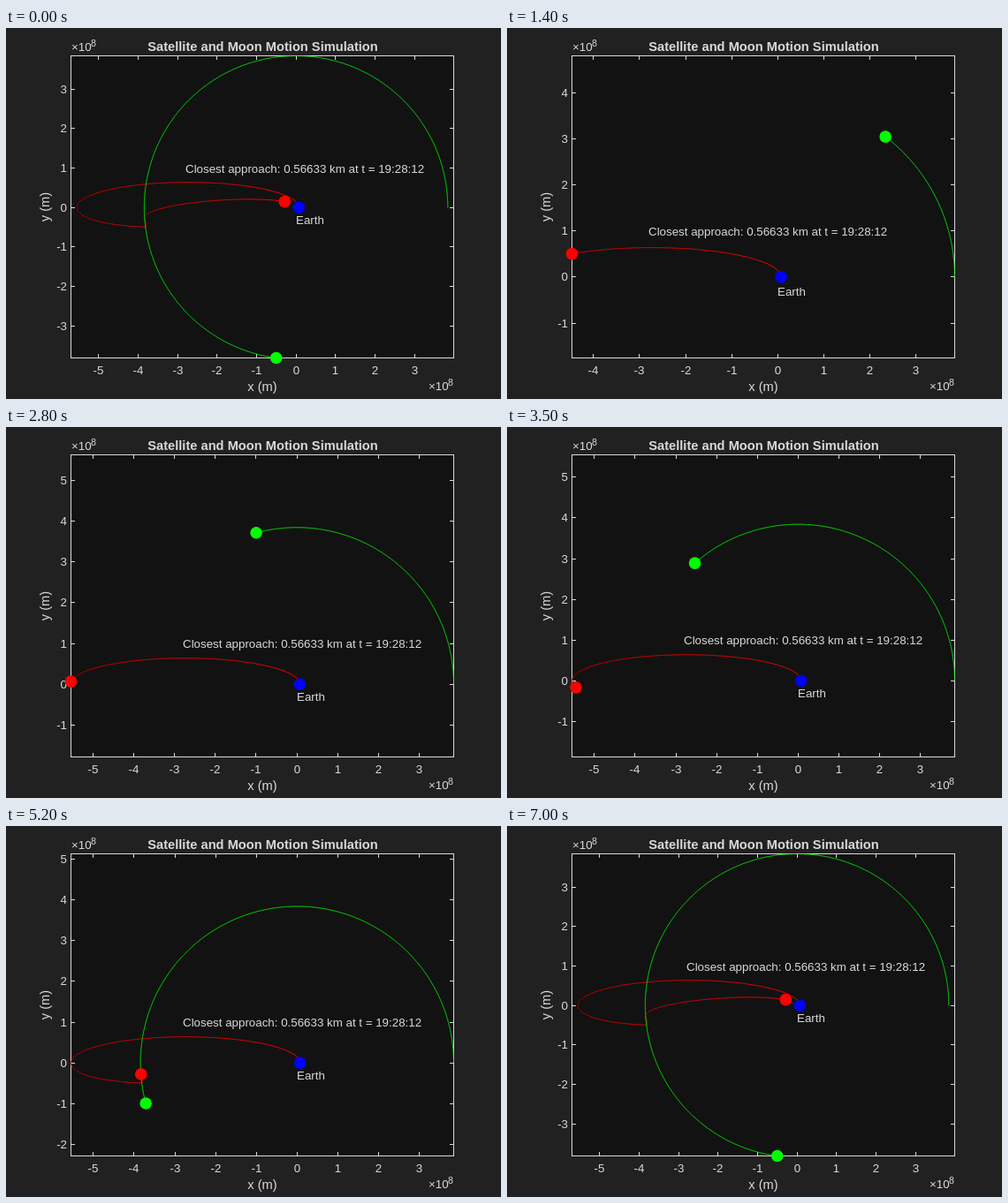
Animation, 560 px wide and 420 px high, one loop 7100 ms. Source, as an HTML page with a canvas:

```html
<!DOCTYPE html>
<html lang="en">
<head>
<meta charset="utf-8">
<title>Satellite and Moon Motion Simulation</title>
<style>
  html, body { margin: 0; height: 100%; overflow: hidden; background: #212121; }
  canvas { display: block; }
</style>
</head>
<body>
<canvas id="stage" width="560" height="420"></canvas>
<script>
const ctx = document.getElementById('stage').getContext('2d');
const STEPS = 70, STEP_MS = 100, SUB = 40;
const BOX = { left: 73.5, right: 506.5, top: 31.5, bottom: 373.5 };
const MID_X = (BOX.left + BOX.right) / 2, MID_Y = (BOX.top + BOX.bottom) / 2;
const INK = '#d9d9d9', FAMILY = '"Liberation Sans", Arial, sans-serif';
const SMALL = '13.333px ' + FAMILY, LARGE = '14.667px ' + FAMILY;
const MOON_R = 3.844, PERIGEE = 0.074;   // in units of 1e8 m

// Kepler's equation with the anomaly measured from apogee
function anomaly(m, e) {
  let u = 0;
  for (let i = 0; i < 14; i++) u -= (u + e * Math.sin(u) - m) / (1 + e * Math.cos(u));
  return u;
}

function moon(n) {
  const angle = n * 3.75 * Math.PI / 180;
  return [MOON_R * Math.cos(angle), MOON_R * Math.sin(angle)];
}

// Outbound transfer ellipse, slightly bent by the Moon after apogee
function outbound(n) {
  const a = 2.812, e = 0.9737, b = 0.64;
  const u = anomaly((n - 30) * Math.PI / 30, e);
  const pull = Math.max(0, (n - 30) / 20) ** 2.2;
  return [-a * (Math.cos(u) + e) - 0.02 * pull, -b * Math.sin(u) + 0.1 * pull];
}

// Smaller, tilted ellipse back to Earth after the flyby
function inbound(n) {
  const u = anomaly((n - 53.05) * Math.PI / 17.15, 0.987);
  const along = 1.912 + 1.937 * Math.cos(u), across = 0.31 * Math.sin(u);
  return [-0.998 * along - 0.065 * across, -0.065 * along + 0.998 * across];
}

function satellite(n) {
  if (n <= 50) return outbound(n);
  if (n >= 52) return inbound(n);
  const t = (n - 50) / 2, from = outbound(50), to = inbound(52), bend = [-3.79, -0.42];
  return from.map((p, i) => (1 - t) ** 2 * p + 2 * t * (1 - t) * bend[i] + t * t * to[i]);
}

const sample = body => Array.from({ length: STEPS * SUB + 1 }, (_, i) => body(i / SUB));
const moonPath = sample(moon), satPath = sample(satellite);

function text(str, x, y, font = SMALL, align = 'left') {
  ctx.font = font;
  ctx.textAlign = align;
  ctx.fillStyle = INK;
  ctx.fillText(str, x, y);
}

function line(points, color) {
  ctx.beginPath();
  for (const p of points) ctx.lineTo(...p);
  ctx.strokeStyle = color;
  ctx.stroke();
}

function disc([x, y], color) {
  ctx.beginPath();
  ctx.arc(x, y, 6.8, 0, 7);
  ctx.fillStyle = color;
  ctx.fill();
}

// Finest round step giving at most 11 ticks
function ticks(lo, hi) {
  for (const step of [0.2, 0.5, 1, 2]) {
    const first = Math.ceil(lo / step), count = Math.floor(hi / step) - first + 1;
    if (count <= 11) return Array.from({ length: count }, (_, i) => Math.round((first + i) * step * 10) / 10);
  }
}

function exponent(x, y) {
  text('×10', x, y);
  text('8', x + 22, y - 5, '10.667px ' + FAMILY);
}

function draw(n) {
  const count = n * SUB + 1;
  const moonTrail = moonPath.slice(0, count), satTrail = satPath.slice(0, count);
  const all = moonTrail.concat(satTrail);
  const xs = all.map(p => p[0]), ys = all.map(p => p[1]);
  const x0 = Math.min(...xs), x1 = Math.max(...xs), y0 = Math.min(...ys), y1 = Math.max(...ys);

  // Tight limits with equal scale on both axes
  const w = BOX.right - BOX.left, h = BOX.bottom - BOX.top;
  const scale = Math.min(w / (x1 - x0), h / (y1 - y0));
  const cx = (x0 + x1) / 2, cy = (y0 + y1) / 2;
  const px = x => MID_X + (x - cx) * scale, py = y => MID_Y - (y - cy) * scale;
  const toPixel = ([x, y]) => [px(x), py(y)];

  ctx.fillStyle = '#212121';
  ctx.fillRect(0, 0, 560, 420);
  ctx.fillStyle = '#121212';
  ctx.fillRect(BOX.left, BOX.top, w, h);
  ctx.lineWidth = 1;
  ctx.strokeStyle = INK;
  ctx.strokeRect(BOX.left, BOX.top, w, h);

  for (const v of ticks(cx - w / 2 / scale, cx + w / 2 / scale)) {
    const x = Math.floor(px(v)) + 0.5;
    line([[x, BOX.top], [x, BOX.top + 4.5]], INK);
    line([[x, BOX.bottom], [x, BOX.bottom - 4.5]], INK);
    text(v, x, 392, SMALL, 'center');
  }
  let widest = 0;
  for (const v of ticks(cy - h / 2 / scale, cy + h / 2 / scale)) {
    const y = Math.floor(py(v)) + 0.5;
    line([[BOX.left, y], [BOX.left + 4.5, y]], INK);
    line([[BOX.right, y], [BOX.right - 4.5, y]], INK);
    text(v, 69, Math.round(y + 4.5), SMALL, 'right');
    widest = Math.max(widest, ctx.measureText(v).width);
  }

  text('Satellite and Moon Motion Simulation', 290.5, 26, 'bold ' + LARGE, 'center');
  text('x (m)', 290, 411, LARGE, 'center');
  ctx.save();
  ctx.translate(Math.round(61 - widest), MID_Y);
  ctx.rotate(-Math.PI / 2);
  text('y (m)', 0, 0, LARGE, 'center');
  ctx.restore();
  exponent(74, 26);
  exponent(478, 410);

  line(satTrail.map(toPixel), '#f00');
  line(moonTrail.map(toPixel), '#0f0');
  disc(toPixel([PERIGEE, 0]), '#00f');
  disc(toPixel(satTrail[count - 1]), '#f00');
  disc(toPixel(moonTrail[count - 1]), '#0f0');

  text('Earth', Math.round(px(0)), Math.round(py(-0.3) + 5));
  text('Closest approach: 0.56633 km at t = 19:28:12', Math.round(px(-2.8)), Math.round(py(1) + 5));
}

// The loop opens on the finished picture, then runs through every step
let shown = -1;
function tick() {
  const n = Math.floor(performance.now() / STEP_MS) % (STEPS + 1) || STEPS;
  if (n !== shown) draw(shown = n);
  requestAnimationFrame(tick);
}
tick();
</script>
</body>
</html>
```
